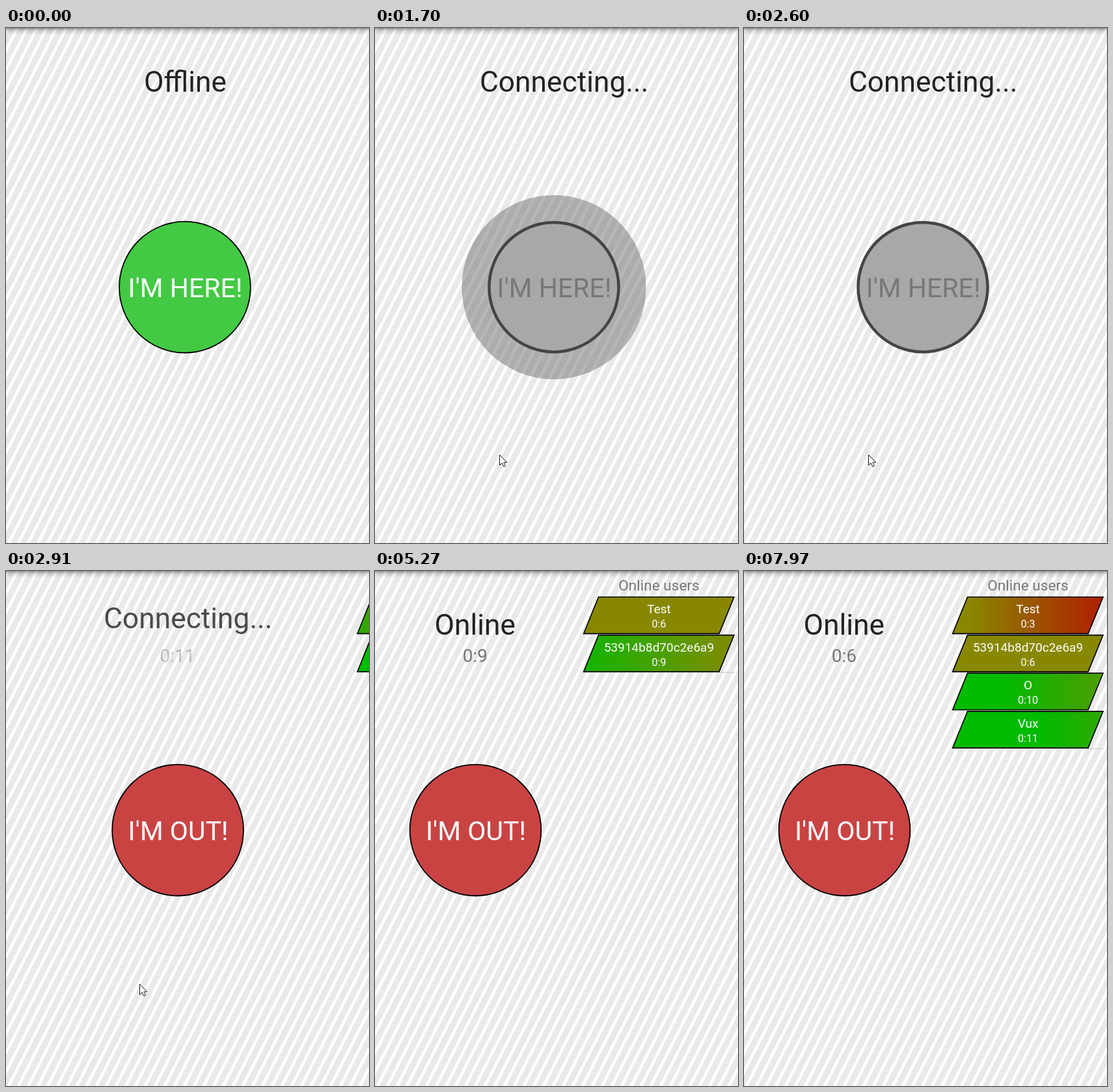
An HTML page that plays this animation: 558 by 792 pixels, repeating every 8 s.

```html
<!DOCTYPE html>
<html lang="en">
<head>
<meta charset="utf-8">
<title>Presence button</title>
<style>
html, body { margin: 0; width: 100%; height: 100%; overflow: hidden; background: #e9e9e9; }
svg { display: block; width: 558px; height: 792px; font-family: Roboto, sans-serif; }
.mid { text-anchor: middle; }
</style>
</head>
<body>
<svg id="stage" viewBox="0 0 558 792" xmlns="http://www.w3.org/2000/svg">
  <defs>
    <pattern id="stripes" width="15" height="40" patternUnits="userSpaceOnUse" patternTransform="skewX(-27)">
      <rect width="15" height="40" fill="#e9e9e9"/>
      <rect width="5.2" height="40" fill="#fff"/>
    </pattern>
    <linearGradient id="shade" x2="0" y2="1">
      <stop stop-color="#000" stop-opacity=".4"/>
      <stop offset=".4" stop-color="#000" stop-opacity=".12"/>
      <stop offset="1" stop-color="#000" stop-opacity="0"/>
    </linearGradient>
  </defs>
  <rect width="558" height="792" fill="url(#stripes)"/>
  <rect width="558" height="11" fill="url(#shade)"/>
  <text id="status" font-size="44.3" fill="#222"></text>
  <text id="timer" class="mid" y="140" font-size="28" fill="#777"></text>
  <circle id="ring" cy="398.6" fill="#777"/>
  <circle id="disc" cy="398.6"/>
  <text id="label" class="mid" y="414.2" font-size="41"></text>
  <g id="panel">
    <text class="mid" x="116.5" y="30" font-size="22.6" fill="#777">Online users</text>
    <path id="rule" stroke="#c4c4c4" d="M209 0H233"/>
  </g>
  <path id="cursor" d="M.5 .5V16.5L4.2 13L7 18.8L9.6 17.6L6.9 12H11.8Z" fill="#fff" stroke="#112" stroke-width="1"/>
</svg>
<script>
const NS = 'http://www.w3.org/2000/svg';
const LOOP = 8000;
const $ = id => document.getElementById(id);
const clamp = v => Math.max(0, Math.min(1, v));
const span = (t, a, b) => clamp((t - a) / (b - a));
const lerp = (a, b, p) => a + (b - a) * p;

function set(el, attrs) {
  for (const k in attrs) el.setAttribute(k, attrs[k]);
  return el;
}
function add(parent, tag, attrs, text) {
  const el = set(document.createElementNS(NS, tag), attrs);
  if (text) el.textContent = text;
  return parent.appendChild(el);
}

// Screen refreshes come in bursts: first time, last time, count
const BURSTS = [
  [300, 1080, 11], [1140, 1220, 2], [1280, 1420, 3], [1610, 1850, 4],
  [2070, 2150, 2], [2220, 2360, 3], [2540, 2910, 6], [3000, 3320, 5],
  [3380, 4140, 12], [4200, 5000, 13], [5060, 5270, 4], [5350, 5800, 8],
  [5890, 6650, 12], [6710, 7460, 11], [7530, 7970, 7]
];
function refresh(t) {
  const b = BURSTS.filter(w => w[0] <= t).pop();
  if (!b) return 0;
  const step = (b[1] - b[0]) / (b[2] - 1);
  return Math.min(b[1], b[0] + Math.floor((t - b[0]) / step + 1e-6) * step);
}

// left: seconds remaining at TICK
const TICK = 3750;
const remaining = (left, t) => left - (t - TICK) / 1000;
const clock = s => '0:' + Math.floor(s + 1e-6);

const BAR = 233;
const SPEED = BAR * 0.36;
const STOPS = [[0, '#00bb00'], [0.347, '#888800'], [0.667, '#888800'], [1, '#bb0000']];
const users = [
  { name: 'Test', left: 8, from: 0 },
  { name: '53914b8d70c2e6a9', left: 11, from: 0 },
  { name: 'O', left: 15, from: 5750 },
  { name: 'Vux', left: 15.72, from: 6750 }
];
users.forEach((u, i) => {
  const id = 'bar' + i;
  u.grad = add($('stage').querySelector('defs'), 'linearGradient', { id, gradientUnits: 'userSpaceOnUse' });
  STOPS.forEach(([offset, color]) => add(u.grad, 'stop', { offset, 'stop-color': color }));
  u.row = add($('panel'), 'g', { transform: `translate(0 ${40 + i * 58.6})` });
  add(u.row, 'path', { d: 'M23.5 0H232L209 56.3H.8Z', fill: `url(#${id})`, stroke: '#000', 'stroke-width': 1.7 });
  const text = { class: 'mid', x: 116.5, fill: '#fff' };
  add(u.row, 'text', { ...text, y: 25, 'font-size': 19 }, u.name);
  u.time = add(u.row, 'text', { ...text, y: 47.3, 'font-size': 16 });
});

// fill, stroke, label colour as RGB, then stroke width
const READY = [67, 201, 67, 0, 0, 0, 255, 255, 255, 1.8];
const BUSY = [168, 168, 168, 68, 68, 68, 119, 119, 119, 4.5];
const ACTIVE = [201, 67, 67, 0, 0, 0, 255, 255, 255, 1.8];

function drawButton(t, x) {
  const red = span(t, 2540, 2760);
  const grey = span(t, 300, 540);
  const look = red > 0
    ? BUSY.map((v, i) => lerp(v, ACTIVE[i], red))
    : READY.map((v, i) => lerp(v, BUSY[i], grey));
  const rgb = i => `rgb(${look.slice(i, i + 3).map(Math.round)})`;
  set($('disc'), { cx: x, r: 101.8 - look[9] / 2, fill: rgb(0), stroke: rgb(3), 'stroke-width': look[9] });
  set($('label'), { x: x + 0.5, fill: rgb(6) });
  $('label').textContent = red > 0 ? "I'M OUT!" : "I'M HERE!";
}

const PULSES = [1100, 1550, 2070];
function drawRing(t, x) {
  const start = PULSES.filter(s => s <= t).pop();
  const age = t - start;
  const on = start && t >= 1140 && age < 245;
  set($('ring'), { cx: x, r: on ? 118.4 + age * 0.166 : 0, opacity: on ? 1 - age / 295 : 0 });
}

// Old text rises and fades, the next one drops into place
const SWAPS = [
  { at: 700, half: 220, from: 'Offline', to: 'Connecting' },
  { at: 2860, half: 210, from: 'Connecting...', to: 'Online' }
];
function drawStatus(t, x) {
  const s = SWAPS[t < 1140 ? 0 : 1];
  const out = span(t, s.at, s.at + s.half);
  const away = out < 1 ? out : 1 - span(t, s.at + s.half, s.at + 2 * s.half);
  const text = out < 1 ? s.from : s.to;
  const rise = 24 * (1 - (1 - away) ** 2);
  set($('status'), { x: x - (text[0] === 'C' ? 114 : 63), y: 98 - rise, opacity: 1 - away * 0.8 - 0.2 * away ** 2 });
  $('status').textContent = text;
}

function drawPanel(t, x) {
  set($('panel'), { transform: `translate(${x} 0)` });
  let shown = 0;
  for (const u of users) {
    const on = t >= u.from;
    const s = remaining(u.left, t);
    const x1 = SPEED * (s - 9.9);
    shown += on;
    set(u.row, { visibility: on ? 'visible' : 'hidden' });
    set(u.grad, { x1, x2: x1 + SPEED * 9.6, y1: 0, y2: 0 });
    u.time.textContent = clock(s);
  }
  set($('rule'), { transform: `translate(0 ${38.9 + shown * 58.6})` });
}

// time, x, y
const PATH = [[1140, 160, 690], [1220, 180, 636], [1420, 191, 656], [2540, 191, 656], [2910, 205, 635], [3320, 208, 630]];
function drawCursor(t) {
  const on = t >= 1140 && t < 3380;
  set($('cursor'), { visibility: on ? 'visible' : 'hidden' });
  if (!on) return;
  const i = Math.min(PATH.length - 2, PATH.findLastIndex(p => p[0] <= t));
  const [a, b] = [PATH[i], PATH[i + 1]];
  const p = span(t, a[0], b[0]);
  set($('cursor'), { transform: `translate(${lerp(a[1], b[1], p)} ${lerp(a[2], b[2], p)})` });
}

function draw(time) {
  const t = refresh(time % LOOP);
  const slide = (1 - Math.cos(Math.PI * span(t, 2813, 3313))) / 2;
  const x = lerp(275, 154.5, slide);
  drawRing(t, x);
  drawButton(t, x);
  drawStatus(t, x);
  set($('timer'), { x: x - 0.6, opacity: span(t, 2860, 2976) });
  $('timer').textContent = clock(remaining(11, t));
  drawPanel(t, 2 * x + 11);
  drawCursor(t);
}

function tick() {
  draw(performance.now());
  requestAnimationFrame(tick);
}
tick();
</script>
</body>
</html>
```
